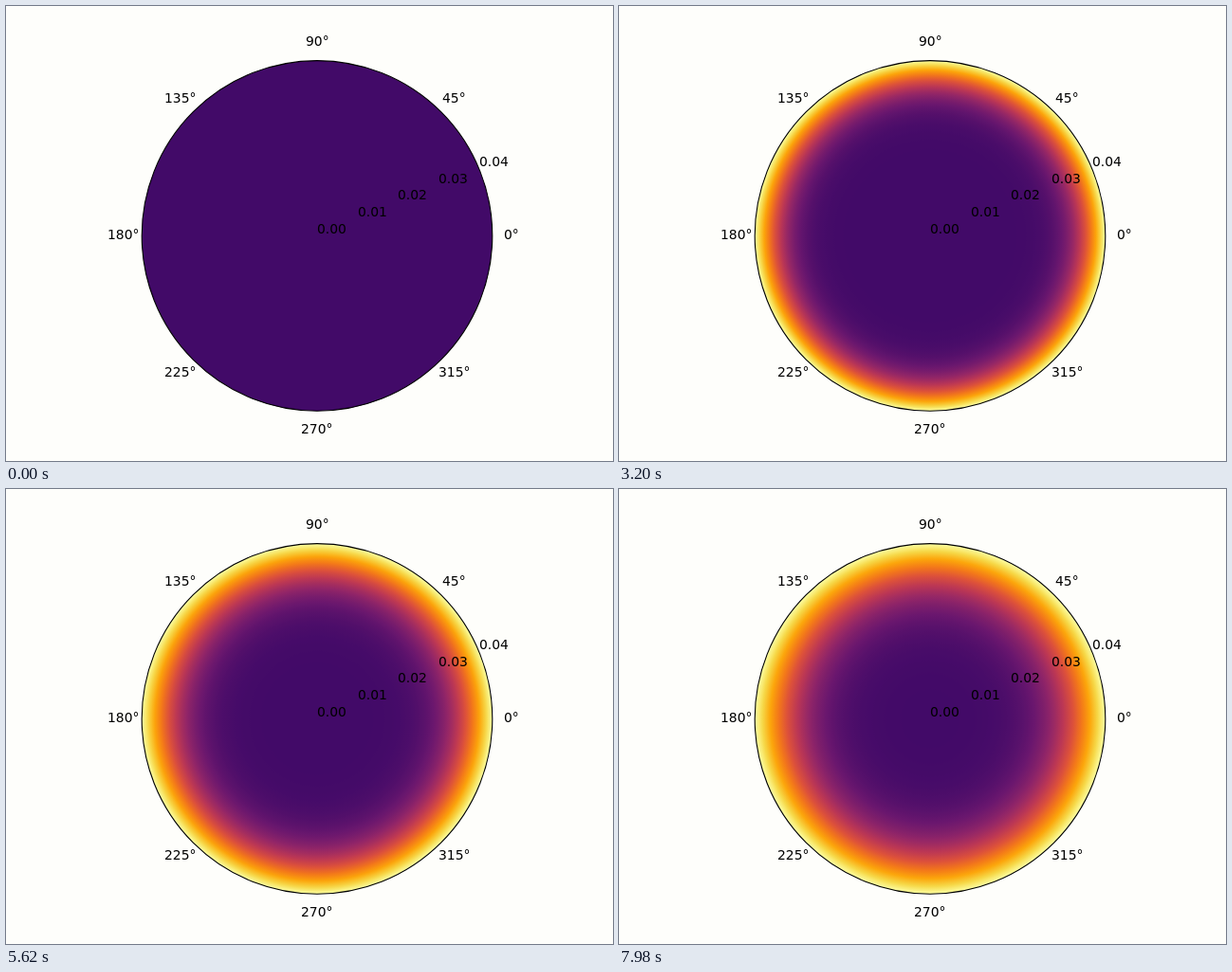
An HTML page for the animation above (8 s loop, 640x480 px).

```html
<!DOCTYPE html>
<html lang="en">
<head>
<meta charset="utf-8">
<title>Heat flow into a disc</title>
<style>
  html, body { margin: 0; width: 100%; height: 100%; overflow: hidden; background: #fefefb; }
  svg { display: block; width: 640px; height: 480px; }
  text { font: 13.89px "DejaVu Sans", sans-serif; fill: #000; }
</style>
</head>
<body>
<svg id="stage" viewBox="0 0 640 480">
  <defs>
    <radialGradient id="heat" gradientUnits="userSpaceOnUse" cx="328" cy="242.4" r="184.8"></radialGradient>
  </defs>
  <circle cx="328" cy="242.4" r="184.8" fill="url(#heat)" stroke="#000" stroke-width="1.11"/>
</svg>
<script>
const NS = "http://www.w3.org/2000/svg";
const LOOP = 8000;
const CX = 328, CY = 242.4, RADIUS = 184.8;
const START = 0.2;       // initial temperature, rim is 1
const SPREAD = 22.5;     // diffusion length in px per sqrt(second)
const STOPS = 92;

// evenly spaced colours from START to 1
const COLORS = ["420a68", "6a176e", "932667", "bc3754", "dd513a", "f37819", "fca50a", "f6d746", "fcffa4"]
  .map(hex => [0, 2, 4].map(i => parseInt(hex.slice(i, i + 2), 16)));

const stage = document.getElementById("stage");
const heat = document.getElementById("heat");

function add(parent, tag, attrs, text) {
  const el = document.createElementNS(NS, tag);
  for (const key in attrs) el.setAttribute(key, attrs[key]);
  if (text) el.textContent = text;
  parent.appendChild(el);
  return el;
}

// labels start on whole pixels
function label(text, x, y) {
  add(stage, "text", { x: Math.round(x), y: Math.round(y) }, text);
}

for (let deg = 0; deg < 360; deg += 45) {
  const a = deg * Math.PI / 180;
  const width = String(deg).length * 8.84 + 6.94;
  label(deg + "°", CX + 204.4 * Math.cos(a) - width / 2, CY + 4 - 204.4 * Math.sin(a));
}
for (let k = 0; k <= 4; k++) {
  label((k / 100).toFixed(2), CX + 42.68 * k, CY - 2.7 - 17.68 * k);
}

const stops = Array.from({ length: STOPS + 1 }, (_, i) => add(heat, "stop", { offset: i / STOPS }));

function erfc(x) {
  const t = 1 / (1 + 0.47047 * x);
  return t * (0.3480242 + t * (-0.0958798 + t * 0.7478556)) * Math.exp(-x * x);
}

// share of the rim's excess heat that has reached radius r
function warmth(r, seconds) {
  if (seconds <= 0) return 0;
  const depth = (RADIUS - r) / (SPREAD * Math.sqrt(seconds));
  return Math.min(1, erfc(depth) * Math.sqrt(RADIUS / Math.max(r, 20)));
}

function color(v) {
  const pos = v * (COLORS.length - 1);
  const i = Math.min(COLORS.length - 2, Math.floor(pos));
  const rgb = COLORS[i].map((c, n) => Math.round(c + (COLORS[i + 1][n] - c) * (pos - i)));
  return "rgb(" + rgb.join(",") + ")";
}

// 18 simulation steps per 840 ms, with a pause after the last one
function simSeconds(ms) {
  const p = ms + 20;
  const cycle = Math.floor(p / 840);
  const tick = Math.floor((p % 840) / 20);
  const step = Math.min(17, Math.ceil((tick + 1) * 17 / 37) - 1);
  return (cycle * 18 + step) * 0.84 / 18;
}

function draw(ms) {
  const s = simSeconds(ms);
  stops.forEach((stop, i) => {
    stop.setAttribute("stop-color", color(warmth(RADIUS * i / STOPS, s)));
  });
}

const begin = performance.now();
function frame() {
  draw((performance.now() - begin) % LOOP);
  requestAnimationFrame(frame);
}
draw(0);
requestAnimationFrame(frame);
</script>
</body>
</html>
```
